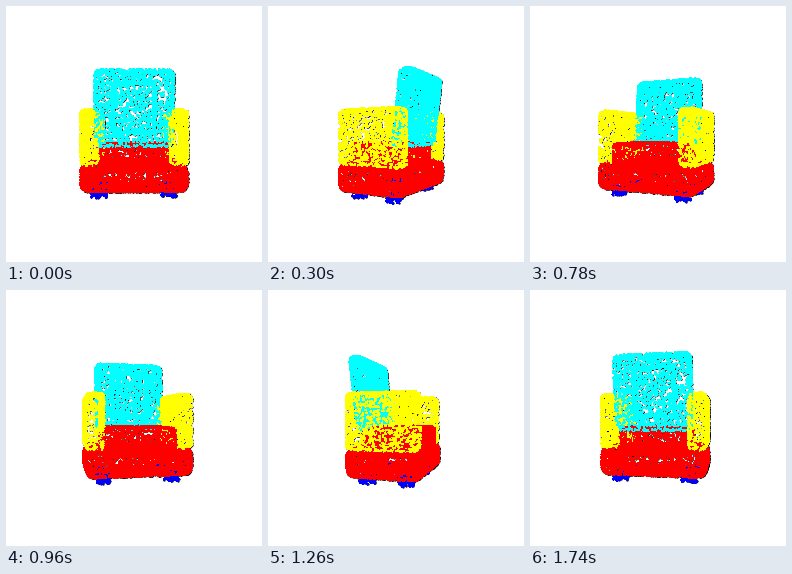
Animation, 256 px wide and 256 px high, one loop 1800 ms. Source, as a matplotlib script:

```python
import numpy as np
import matplotlib.pyplot as plt
from matplotlib.animation import FuncAnimation

SIZE, DPI = 256, 72
FRAMES, INTERVAL = 30, 60
CAMERA = 300          # distance from the eye to the turning axis
DENSITY = 0.125       # points per unit of surface
CYAN, YELLOW, RED, BLUE = "#00ffff", "#ffff00", "#ff0000", "#0000ff"

rng = np.random.default_rng(7)


def rounded_box(lo, hi, radius, density=DENSITY):
    """Random points on the surface of a box with rounded edges."""
    lo, hi = np.array(lo, float), np.array(hi, float)
    mid, half = (lo + hi) / 2, (hi - lo) / 2
    areas = np.array([half[1] * half[2], half[0] * half[2], half[0] * half[1]])
    count = int(8 * areas.sum() * density)
    axis = rng.choice(3, count, p=areas / areas.sum())
    pts = rng.uniform(-1, 1, (count, 3)) * half
    pts[np.arange(count), axis] = rng.choice([-1, 1], count) * half[axis]
    core = np.clip(pts, radius - half, half - radius)
    out = pts - core
    out *= radius / np.linalg.norm(out, axis=1, keepdims=True)
    return mid + core + out


def panel_frame(half_w, bottom, top, depth, count):
    """Points along the rim of the panel set into the backrest."""
    w, h = 2 * half_w, top - bottom
    t = rng.uniform(0, 2 * (w + h), count)
    x = np.interp(t, [0, w, w + h, 2 * w + h, 2 * (w + h)],
                  [-half_w, half_w, half_w, -half_w, -half_w])
    y = np.interp(t, [0, w, w + h, 2 * w + h, 2 * (w + h)],
                  [bottom, bottom, top, top, bottom])
    pts = np.column_stack([x, y, np.full(count, depth)])
    return pts + rng.normal(0, 0.9, pts.shape)


def foot(x, z, radius=7.5, bottom=-59.5, top=-52, count=75):
    angle = rng.uniform(0, 2 * np.pi, count)
    r = radius * np.sqrt(rng.uniform(0.1, 1, count))
    y = rng.uniform(bottom, top, count)
    return np.column_stack([x + r * np.cos(angle), y, z + r * np.sin(angle)])


def build_chair():
    back = np.vstack([
        rounded_box((-36, -12, 18), (36, 58, 32), 6),
        panel_frame(19, 2, 47, 19, 420),
    ])
    back[:, 2] += 0.12 * (back[:, 1] - 23)      # recline
    parts = [
        (back, CYAN),
        (rounded_box((-49, -28.5, -34), (-33, 22.5, 32), 5), YELLOW),
        (rounded_box((33, -28.5, -34), (49, 22.5, 32), 5), YELLOW),
        (rounded_box((-33, -35, -34), (33, -9, 24), 4, 0.16), RED),
        (rounded_box((-49, -53, -36), (49, -27, 33), 8, 0.15), RED),
    ]
    parts += [(foot(x, z), BLUE) for x in (-33, 33) for z in (-20, 17)]
    points = np.vstack([p for p, _ in parts])
    colors = np.concatenate([[c] * len(p) for p, c in parts])
    return points, plt.matplotlib.colors.to_rgba_array(colors)


points, colors = build_chair()

fig = plt.figure(figsize=(SIZE / DPI, SIZE / DPI), dpi=DPI, facecolor="white")
ax = fig.add_axes((0, 0, 1, 1))
ax.set(xlim=(0, SIZE), ylim=(SIZE, 0))
ax.axis("off")


def dots(diameter, color):
    return ax.scatter(points[:, 0], points[:, 1], s=diameter ** 2, c=color,
                      marker="o", linewidths=0, antialiased=False)


shade = dots(2.3, "black")
cloud = dots(1.7, colors)


def draw(frame):
    angle = 2 * np.pi * frame / FRAMES
    x, y, z = points.T
    side = x * np.cos(angle) + z * np.sin(angle)
    near = z * np.cos(angle) - x * np.sin(angle)
    scale = CAMERA / (CAMERA - near)
    screen = SIZE / 2 + np.column_stack([side * scale, -y * scale])
    order = np.argsort(near)
    shade.set_offsets(screen)
    cloud.set_offsets(screen[order])
    cloud.set_facecolors(colors[order])
    return shade, cloud


anim = FuncAnimation(fig, draw, frames=FRAMES, interval=INTERVAL,
                     repeat=True, repeat_delay=0, blit=False)
plt.show()
```
